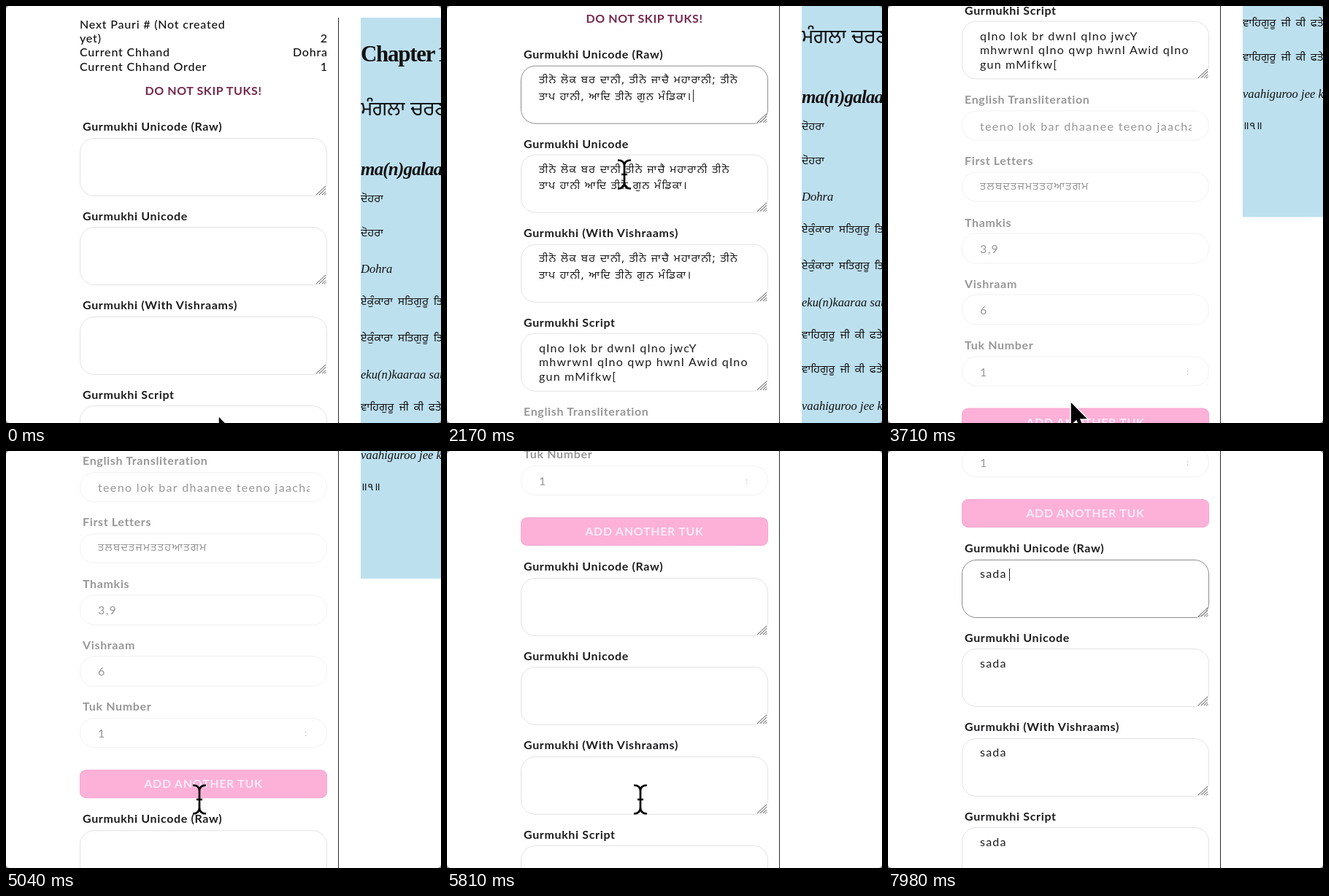
Recreate the animation shown at these times as an HTML page. Size 596 by 572 pixels, loop 8 s.

```html
<!DOCTYPE html>
<html lang="en">
<head>
<meta charset="utf-8">
<title>Tuk form</title>
<style>
html, body { margin: 0; width: 100%; height: 100%; overflow: hidden; background: #fff; }
#stage { position: relative; width: 596px; height: 572px; overflow: hidden; background: #fff; font: 16px/20px Lato, "Noto Sans Gurmukhi", "Noto Sans", sans-serif; color: #1c1c1e; }
#stage * { box-sizing: border-box; }
#page, #page div, #page svg, #pointer, #pointer svg, .ring, #corners { position: absolute; }
#page { left: 0; top: 0; width: 596px; height: 1660px; animation: scroll 8s infinite; }
#page div { white-space: nowrap; }

.info { left: 101px; width: 339px; font-weight: 500; letter-spacing: .8px; color: #111; }
.info i { position: absolute; right: -.8px; font-style: normal; }
.warn { left: 101px; width: 339px; top: 106px; text-align: center; font-weight: 700; letter-spacing: .6px; color: #74294c; }
.label { left: 105px; font-weight: 700; letter-spacing: .65px; }
.box { left: 101px; width: 339px; height: 80px; border: 1px solid #e2e2e2; border-radius: 20px; }
.box svg { right: -1px; bottom: -1px; }
.text { left: 24px; top: 8.5px; line-height: 19.5px; letter-spacing: 1.2px; }
.gur { top: 9.5px; font-family: "Noto Sans Gurmukhi", "Noto Sans", sans-serif; font-weight: 300; line-height: 22.5px; font-size: 15px; letter-spacing: 1.45px; }
.pill { height: 41.5px; border-color: #f1f1f1; color: #979797; }
.pill .text { top: 10px; width: 290px; overflow: hidden; line-height: 20px; letter-spacing: 1.35px; }
.off { color: #979797; }
.spin { right: 27px; top: 10px; font-size: 11px; color: #b5b5b5; }
.button { left: 101px; top: 1078.5px; width: 339px; height: 39.5px; border-radius: 9px; background: #fdb1d8; box-shadow: inset 0 0 0 1px #f3a9d0; color: #f9eafa; font-weight: 700; line-height: 37px; text-align: center; letter-spacing: .7px; }
.rule { left: 455px; top: 16px; width: 1px; bottom: 0; background: #2b2b2b; }
.panel { left: 486px; top: 16px; width: 110px; height: 800.5px; overflow: hidden; background: #bde0ef; color: #111; }
.panel div { left: 0; transform: translateY(-50%); line-height: 1.2; font-family: "Liberation Serif", serif; }
.panel .g { font: 300 15px/1.2 "Noto Sans Gurmukhi", "Noto Sans", sans-serif; letter-spacing: .35px; word-spacing: 2.5px; }
.panel .it { font-style: italic; font-size: 16.6px; }

.caret { position: absolute; left: 24px; top: 11px; width: 1px; height: 17px; background: #222; }
.tail { display: inline-block; width: 1px; height: 17px; margin-left: 1px; background: #222; vertical-align: -3px; }
.step { animation-duration: 8s; animation-iteration-count: infinite; animation-timing-function: step-end; }
.paste0 { animation-name: paste0; }
.paste1 { animation-name: paste1; }
.focus1 { animation-name: focus1; }
.focus2 { animation-name: focus2; }
.caret1 { animation-name: caret1; }
.caret2 { animation-name: caret2; }

#pointer { left: 0; top: 0; animation: move 8s infinite ease-in-out; }
#pointer svg { left: 0; top: 0; overflow: visible; }
.arrow { animation-name: arrow; }
.beam { animation-name: beam; }
.ring { width: 92px; height: 92px; border: 1.6px solid #000; border-radius: 50%; animation: 8s infinite ease-out; }
#corners { inset: 0; border-radius: 5px; box-shadow: 0 0 0 6px #8d8d8d; }

@keyframes scroll {
  0%, 25.4% { transform: none; animation-timing-function: cubic-bezier(.45,.1,.8,.75); }
  29.75% { transform: translateY(-425px); animation-timing-function: cubic-bezier(.4,.7,.7,1); }
  31.5%, 57.75% { transform: translateY(-527.5px); animation-timing-function: ease-in-out; }
  66.5% { transform: translateY(-698px); animation-timing-function: linear; }
  67.375% { transform: translateY(-700px); animation-timing-function: cubic-bezier(.4,.1,.6,.9); }
  72.625% { transform: translateY(-988px); animation-timing-function: ease-out; }
  77%, 100% { transform: translateY(-1013px); }
}
@keyframes move {
  0%, .3% { transform: translate(291px, 562px); }
  7.875%, 35% { transform: translate(243px, 231px); }
  42%, 42.9% { transform: translate(288px, 495px); }
  46.375% { transform: translate(250px, 542px); }
  49.875%, 57.75% { transform: translate(254px, 558px); }
  63%, 72.8% { transform: translate(265px, 478px); }
  78.75%, 100% { transform: translate(265px, 226px); }
}
@keyframes arrow {
  0% { visibility: visible; }
  3.5% { visibility: hidden; }
  38.5% { visibility: visible; }
  59.5%, 100% { visibility: hidden; }
}
@keyframes beam {
  0% { visibility: hidden; }
  3.5% { visibility: visible; }
  38.5% { visibility: hidden; }
  59.5% { visibility: visible; }
  91.875%, 100% { visibility: hidden; }
}
@keyframes ring1 {
  0%, 13.1% { opacity: 0; transform: scale(.3); }
  13.125% { opacity: 1; transform: scale(.3); }
  15.75%, 18% { opacity: 1; transform: none; }
  21%, 100% { opacity: 0; transform: none; }
}
@keyframes ring2 {
  0%, 51.6% { opacity: 0; transform: scale(.3); }
  51.625% { opacity: 1; transform: scale(.3); }
  53.4% { opacity: 1; transform: none; }
  55.5%, 100% { opacity: 0; transform: none; }
}
@keyframes ring3 {
  0%, 81.3% { opacity: 0; transform: scale(.3); }
  81.375% { opacity: 1; transform: scale(.3); }
  84%, 86.2% { opacity: 1; transform: none; }
  89.25%, 100% { opacity: 0; transform: none; }
}
@keyframes paste0 { 0% { visibility: hidden; } 22.75%, 100% { visibility: visible; } }
@keyframes paste1 { 0% { visibility: hidden; } 23.625%, 100% { visibility: visible; } }
@keyframes focus1 { 0% { border-color: #e2e2e2; } 13.125% { border-color: #8c8c8c; } 51.625%, 100% { border-color: #e2e2e2; } }
@keyframes focus2 { 0% { border-color: #e2e2e2; } 81.375%, 100% { border-color: #8c8c8c; } }
@keyframes caret1 { 0% { opacity: 0; } 13.125% { opacity: 1; } 20.125%, 100% { opacity: 0; } }
@keyframes caret2 {
  0% { opacity: 0; left: 24px; }
  81.375% { opacity: 1; left: 24px; }
  88.375% { opacity: 0; left: 24px; }
  91.875% { opacity: 1; left: 33px; }
  92.75% { opacity: 1; left: 42px; }
  94.5% { opacity: 1; left: 53px; }
  96.25%, 100% { opacity: 1; left: 63.5px; }
}
@keyframes key0 { 0% { visibility: hidden; } 91.875%, 100% { visibility: visible; } }
@keyframes key1 { 0% { visibility: hidden; } 92.75%, 100% { visibility: visible; } }
@keyframes key2 { 0% { visibility: hidden; } 94.5%, 100% { visibility: visible; } }
@keyframes key3 { 0% { visibility: hidden; } 96.25%, 100% { visibility: visible; } }
</style>
</head>
<body>
<div id="stage">
  <div id="page">
    <div class="info" style="top:15px">Next Pauri # (Not created</div>
    <div class="info" style="top:34px">yet)<i>2</i></div>
    <div class="info" style="top:53px">Current Chhand<i>Dohra</i></div>
    <div class="info" style="top:73px">Current Chhand Order<i>1</i></div>
    <div class="warn">DO NOT SKIP TUKS!</div>
    <div class="button">ADD ANOTHER TUK</div>
    <div class="rule"></div>
    <div class="panel"></div>
  </div>
  <div class="ring" style="left:189.5px;top:170px;animation-name:ring1"></div>
  <div class="ring" style="left:204px;top:512px;animation-name:ring2"></div>
  <div class="ring" style="left:211.5px;top:165px;animation-name:ring3"></div>
  <div id="pointer">
    <svg class="step arrow" width="1" height="1"><path d="M0 0V34L8 27L13 39L19 36.500L14 25H24.500Z" stroke="#fff" stroke-width="1.500"/></svg>
    <svg class="step beam" width="1" height="1"><path d="M-9-19.500C-3-19.500 0-17 0-11V11C0 17-3 19.500-9 19.500M9-19.500C3-19.500 0-17 0-11V11C0 17 3 19.500 9 19.500M-4 0H4" fill="none" stroke="#000" stroke-width="2.700"/></svg>
  </div>
  <div id="corners"></div>
</div>
<script>
const page = document.getElementById('page');
const panel = page.querySelector('.panel');
const add = (parent, html) => parent.insertAdjacentHTML('beforeend', html);
const GAP = 122.5;
const grip = '<svg width="16" height="16"><path d="M1 14L14 2M5 14L14 5.500M9 14L14 9.500M12 14.500L14.500 12" stroke="#555" fill="none"/></svg>';

function field(label, top, inner, boxClass = '', labelClass = '') {
  add(page, `<div class="label ${labelClass}" style="top:${top - 25.5}px">${label}</div>
    <div class="box ${boxClass}" style="top:${top}px">${inner}</div>`);
}

const labels = ['Gurmukhi Unicode (Raw)', 'Gurmukhi Unicode', 'Gurmukhi (With Vishraams)', 'Gurmukhi Script'];
const verse = 'ਤੀਨੋ ਲੋਕ ਬਰ ਦਾਨੀ, ਤੀਨੋ ਜਾਚੈ ਮਹਾਰਾਨੀ; ਤੀਨੋ<br>ਤਾਪ ਹਾਨੀ, ਆਦਿ ਤੀਨੋ ਗੁਨ ਮੰਡਿਕਾ।';
const verses = [
  verse + '<span class="tail"></span>',
  verse.replace(/[,;]/g, ''),
  verse,
  'qIno lok br dwnI qIno jwcY<br>mhwrwnI qIno qwp hwnI Awid qIno<br>gun mMifkw['
];
const typed = [...'sada'].map((c, i) => `<span class="step" style="animation-name:key${i}">${c}</span>`).join('');

labels.forEach((label, i) => {
  const caret = n => i ? '' : `<span class="caret step caret${n}"></span>`;
  const focus = n => i ? '' : `step focus${n}`;
  field(label, 180.5 + i * GAP,
    `<div class="text step paste${i ? 1 : 0} ${i < 3 ? 'gur' : ''}">${verses[i]}</div>${caret(1)}${grip}`, focus(1));
  field(label, 1161.5 + i * GAP, `<div class="text">${typed}</div>${caret(2)}${grip}`, focus(2));
});

[
  ['English Transliteration', 'teeno lok bar dhaanee teeno jaachai mahaaraanee'],
  ['First Letters', 'ਤਲਬਦਤਜਮਤਤਹਆਤਗਮ', 'gur'],
  ['Thamkis', '3,9'],
  ['Vishraam', '6'],
  ['Tuk Number', '1']
].forEach(([label, text, cls = ''], i) => {
  const spin = i === 4 ? '<div class="spin">:</div>' : '';
  field(label, 670.5 + i * 84.25, `<div class="text ${cls}">${text}</div>${spin}`, 'pill', 'off');
});

// centre y, class, text, extra style
[
  [66, '', 'Chapter 1', 'font-size:31px;font-weight:700;letter-spacing:-1.3px;word-spacing:-2px'],
  [144, 'g', 'ਮੰਗਲਾ ਚਰਣ', 'font-size:27px;letter-spacing:0;word-spacing:0'],
  [224, 'it', 'ma(n)galaa charan', 'font-size:25px;font-weight:700;letter-spacing:-.8px'],
  [266, 'g', 'ਦੋਹਰਾ'],
  [313, 'g', 'ਦੋਹਰਾ'],
  [361, 'it', 'Dohra'],
  [407, 'g', 'ਏਕੁੰਕਾਰਾ ਸਤਿਗੁਰੂ ਤਿਸੁ'],
  [457, 'g', 'ਏਕੁੰਕਾਰਾ ਸਤਿਗੁਰੂ ਤਿਸੁ'],
  [506, 'it', 'eku(n)kaaraa satiguroo'],
  [552, 'g', 'ਵਾਹਿਗੁਰੂ ਜੀ ਕੀ ਫਤੇ ਹੈ'],
  [599, 'g', 'ਵਾਹਿਗੁਰੂ ਜੀ ਕੀ ਫਤੇ ਹੈ'],
  [648, 'it', 'vaahiguroo jee kee'],
  [693, 'g', '॥੧॥']
].forEach(([y, cls, text, style = '']) =>
  add(panel, `<div class="${cls}" style="top:${y - 16}px;${style}">${text}</div>`));
</script>
</body>
</html>
```
